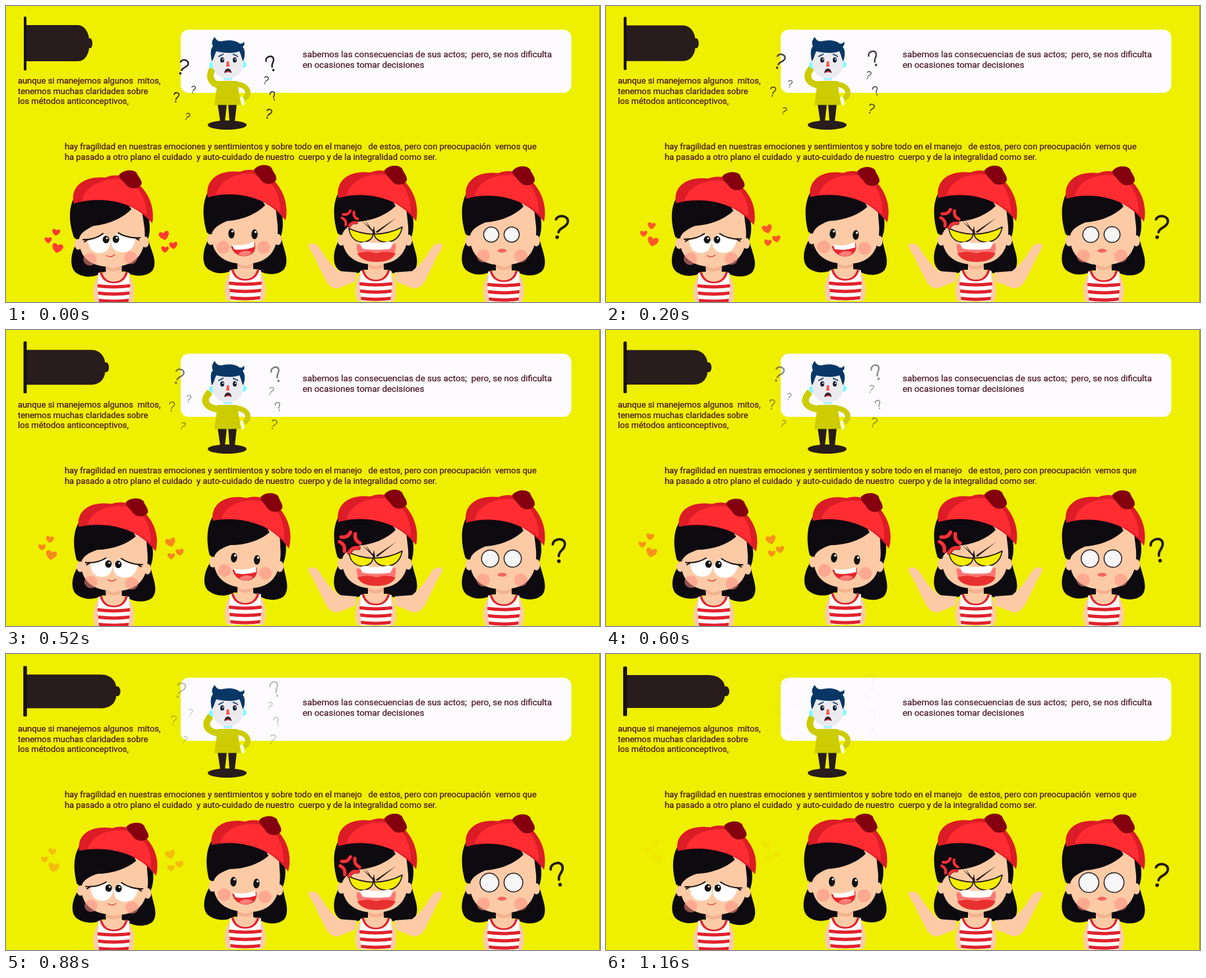
Recreate the animation shown at these times as an HTML page. Size 901x450 px, loop 1200 ms.

```html
<!DOCTYPE html>
<html lang="es">
<head>
<meta charset="utf-8">
<style>
html, body { margin: 0; height: 100%; overflow: hidden; background: #efef00; }
svg { display: block; width: 901px; height: 450px; }
text { font-family: Roboto, Arial, sans-serif; fill: #430d1a; stroke: #430d1a; stroke-width: .2; white-space: pre; }
</style>
</head>
<body>
<svg id="stage" viewBox="0 0 901 450" xmlns="http://www.w3.org/2000/svg">
<defs>
  <g id="ask">
    <path d="M-.47-.55C-.42-1.08 .6-1.12 .52-.5C.46-.05 0-.02 0 .42" fill="none" stroke="#221a1a" stroke-width=".2" stroke-linecap="round"/>
    <circle cy=".84" r=".15" fill="#221a1a"/>
  </g>
  <path id="heart" d="M0 .9C-1.7-.1-.9-1.4 0-.5C.9-1.4 1.7-.1 0 .9" fill="#ff3c32"/>
  <g id="backHair">
    <path fill="#0d0a10" d="M697 288C686 320 699 342 701 354C690 370 687 395 700 403C712 411 728 409 738 402H772C785 412 805 412 814 402C823 388 812 370 809 352C815 335 812 310 800 295Z"/>
  </g>
  <g id="body">
    <path fill="#fccba6" d="M743 388H767V402Q781 404 784 420Q788 435 783 450H727Q721 435 726 420Q729 404 743 402Z"/>
    <path fill="#f3b28e" d="M743 392Q755 401 767 392V398Q755 405 743 398Z"/>
    <clipPath id="vest"><path d="M731 404L737 402Q741 417 755 417Q769 417 773 402L779 404Q777 416 780 423L777 450H733L730 423Q733 416 731 404Z"/></clipPath>
    <g clip-path="url(#vest)" fill="none" stroke="#e0222c">
      <rect x="720" y="400" width="70" height="50" fill="#fff" stroke="none"/>
      <path stroke-width="5" d="M722 422Q755 428 788 422M722 433Q755 439 788 433M722 444Q755 450 788 444"/>
      <path stroke-width="5" d="M736 402Q740 417 755 417Q770 417 774 402"/>
    </g>
  </g>
  <g id="head">
    <g fill="#fccba6">
      <ellipse cx="702.500" cy="357" rx="5.500" ry="8.500"/><ellipse cx="804.500" cy="357" rx="5.500" ry="8.500"/>
      <path d="M704 300V340C701 372 714 394 754 394C794 394 806 370 804 335L800 300Z"/>
    </g>
    <path fill="#0d0a10" d="M699 284C689 300 690 325 697 347L704 349C706 340 715 334 727 329C752 327 772 318 785 305L770 280Z"/>
    <path fill="#dc1c26" d="M698 293C693 267 714 250 747 254C764 246 790 254 804 274C816 290 820 310 816 328C804 313 789 301 768 294C745 287 720 287 698 293Z"/>
    <path fill="#ff2d32" d="M711 289C715 268 740 255 768 257C794 262 808 284 808 315C797 305 785 299 768 294C745 287 728 287 711 289Z"/>
    <path fill="#85000f" d="M768 251C773 243 789 241 795 248C797 255 803 259 802 266C797 275 784 274 779 267C775 261 769 258 768 251Z"/>
  </g>
</defs>

<rect width="901" height="450" fill="#efef00"/>
<rect x="900" width="1" height="450" fill="#95950f"/>
<rect x="265" y="36" width="592.500" height="96" rx="12" fill="#fdfbfe"/>
<path id="sleeve" fill="#281c1c"/>
<rect id="ring" fill="#17100f" rx="1.500"/>

<g id="man">
  <ellipse cx="335.500" cy="181" rx="29.500" ry="7" fill="#281c1c"/>
  <path fill="#281c1c" d="M321 149H335L332 176H325ZM337 149H350L347 176H339Z"/>
  <path fill="none" stroke="#cccc00" stroke-width="8" d="M346 119C366 118 373 133 361 141"/>
  <path fill="#fff" d="M355 139L359 137L362 150L358 151Z"/>
  <path id="arm" fill="none" stroke="#cccc00" stroke-width="10" stroke-linejoin="round"/>
  <path fill="#ebebef" d="M330 103H343V115H330Z"/>
  <path fill="#8ffbff" d="M330 109H343V112H330Z"/>
  <path fill="#cccc00" d="M321 114H351L356 150.500H316Z"/>
  <g fill="#7ffaff"><circle cx="313.500" cy="90" r="5.500"/><circle cx="360" cy="89" r="5"/></g>
  <path fill="#ebebef" d="M313 70H360V88C359 102 349 110 337 110C324 110 314 102 313 88Z"/>
  <path fill="#083765" d="M312 84C310 72 310 65 314 61C311 57 313 50 317 47C318 52 323 55 330 53C340 51 350 53 354 57Q359 58 361 54Q363 59 359 62C364 68 362 78 360 84C357 80 357 74 354 69C342 73 327 71 319 69C316 74 316 80 312 84Z"/>
  <path fill="none" stroke="#083765" stroke-width="1.500" d="M322 77L330 73M344 73L352 77"/>
  <g fill="#142033"><ellipse cx="328" cy="82" rx="3" ry="4"/><ellipse cx="347" cy="82" rx="3" ry="4"/></g>
  <g fill="#fff"><circle cx="329" cy="81" r="1"/><circle cx="348" cy="81" r="1"/></g>
  <path fill="#ff5045" d="M335 84H338L339 92H334Z"/>
  <path fill="#38202a" d="M331 102Q332 95 337 95Q342 96 342 102Q337 99 331 102Z"/>
  <path fill="#ee4b44" d="M333 101Q337 97 341 101Z"/>
</g>
<g id="copy"></g>
<g id="girls"></g>
<g id="marks"></g>
<g id="rage" fill="none" stroke-linecap="round"></g>
</svg>

<script>
const LOOP = 1200, STEP = 40;
const $ = id => document.getElementById(id);
const set = (el, attrs) => { for (const k in attrs) el.setAttribute(k, attrs[k]); };

// Running text: x, first baseline, font size, lines
const copy = [
  [18, 118, 12.9, "aunque si manejemos algunos  mitos,", "tenemos muchas claridades sobre", "los métodos anticonceptivos,"],
  [450, 78, 13.33, "sabemos las consecuencias de sus actos;  pero, se nos dificulta", "en ocasiones tomar decisiones"],
  [89, 218, 12.9, "hay fragilidad en nuestras emociones y sentimientos y sobre todo en el manejo   de estos, pero con preocupación  vemos que",
    "ha pasado a otro plano el cuidado  y auto-cuidado de nuestro  cuerpo y de la integralidad como ser."]
];
$("copy").innerHTML = copy.map(([x, y, size, ...lines]) =>
  lines.map((s, i) => `<text x="${x}" y="${y + i * 15.6}" font-size="${size}">${s}</text>`).join("")).join("");

const cheeks = (x1, x2, y) =>
  `<g fill="#ff8f80" opacity=".55"><circle cx="${x1}" cy="${y}" r="10"/><circle cx="${x2}" cy="${y}" r="10"/></g>`;

const sad = cheeks(128, 190, 383) + `
  <path fill="#fff" d="M126 354Q139 351 150 344Q160 348 160 358Q158 374 143 374Q128 373 126 354ZM198 354Q185 351 172 344Q161 348 161 358Q163 374 179 374Q195 373 198 354Z"/>
  <g fill="#111"><ellipse cx="153.500" cy="353" rx="5" ry="6"/><ellipse cx="168.500" cy="353" rx="5" ry="6"/></g>
  <g fill="#fff"><circle cx="155" cy="351" r="1.500"/><circle cx="170" cy="351" r="1.500"/></g>
  <path fill="none" stroke="#17100f" stroke-width="2" d="M150 343Q137 353 118 352M120 356L126 352M172 343Q186 353 206 352M204 356L198 352"/>
  <path fill="none" stroke="#e2453c" stroke-width="1.500" d="M153 378Q160 383 166 377"/>`;

const happy = cheeks(329, 391, 367) + `
  <g fill="#111"><ellipse cx="342" cy="346" rx="4.700" ry="7.500"/><ellipse cx="377" cy="347" rx="4.700" ry="7.500"/></g>
  <g fill="#fff"><circle cx="343.500" cy="342.500" r="1.700"/><circle cx="378.500" cy="343.500" r="1.700"/></g>
  <path fill="#e5262c" d="M341 365Q360 367 377 359Q381 372 371 378Q359 384 348 376Q343 372 341 365Z"/>
  <path fill="#ff7d78" d="M352 377Q361 369 373 374Q369 380 361 380Q355 380 352 377Z"/>
  <path fill="#fff" d="M343 363Q360 366 376 358L377 366Q362 372 346 370Z"/>`;

const angry = `
  <g fill="#f5ee00" stroke="#17100f" stroke-width="1.500" stroke-linejoin="round">
    <path d="M520 338Q536 346 557 347Q554 359 539 359Q523 357 520 338Z"/>
    <path d="M601 336Q583 346 558 347Q562 359 578 359Q597 357 601 336Z"/>
  </g>
  <path fill="#17100f" d="M540 327L557 341L558 345ZM561 343L592 322L563 345ZM556 346L558 334L560 346ZM551 336L544 325L554 338Z"/>
  <path fill="#ff7672" d="M532 362Q562 369 591 361Q594 389 562 389Q530 389 532 362Z"/>
  <path fill="#e8302f" d="M533 376Q548 371 562 376Q577 371 591 376Q585 389 562 389Q539 389 533 376Z"/>
  <path fill="#fff" d="M537 362Q540 357 549 359Q562 362 575 359Q584 356 587 361L583 369Q562 372 541 369Z"/>`;

const blank = cheeks(724, 781, 380) + `
  <g fill="#f7f6f6" stroke="#292225" stroke-width="1.500"><circle id="eyeL" cy="347.500"/><circle id="eyeR" cy="347.500"/></g>
  <ellipse cx="752.500" cy="372" rx="7" ry="3" fill="#f2685f"/>`;

const arm = `<path fill="#fccba6" d="M459 364C461 359 470 361 474 366C480 374 488 390 505 403L532 405L530 419L504 429Q492 431 484 415L471 389C468 379 460 371 459 364Z"/>`;
const arms = arm + `<g transform="translate(1121 0) scale(-1 1)">${arm}</g>`;

function girl(x, y, face, extra = "") {
  const back = `translate(${-x} ${-y})`;
  return `<g transform="translate(${x} ${y})"><g class="turn"><use href="#backHair"/></g>
    <g transform="${back}">${extra}</g><use href="#body"/>
    <g class="turn"><use href="#head"/><g transform="${back}">${face}</g></g></g>`;
}
$("girls").innerHTML = girl(-591.5, 2, sad) + girl(-392, -2, happy) + girl(-194, -1, angry, arms) + girl(0, 0, blank);
const turns = [...document.querySelectorAll(".turn")];

// Floating signs: shape, x, y, half size, tilt
const group = (name, list) => list.map(([x, y, s, r]) =>
  `<use href="#${name}" transform="translate(${x} ${y}) rotate(${r}) scale(${s})"/>`).join("");
$("marks").innerHTML = [
  group("ask", [[268, 93, 12, 20], [284, 127, 5.5, 10], [258, 139, 7.5, 6], [275, 168, 5.5, 25]]),
  group("ask", [[402, 88, 12, -20], [394, 113, 6, 18], [405, 137, 7, -20], [398, 164, 7.5, 18]]),
  group("heart", [[64, 356, 5.5, 0], [76, 344, 6, 8], [78, 368, 8.3, 12]]),
  group("heart", [[240, 349, 7.7, -14], [241, 370, 5.7, 4], [254, 364, 6.2, -8]]),
  `<use href="#ask"/>`
].map(s => `<g>${s}</g>`).join("");
const [askL, askR, heartL, heartR, bigAsk] = $("marks").children;

const corners = [0, 90, 180, 270].map(a => `<path transform="rotate(${a})" d="M3 12Q4 4 12 3"/>`).join("");
$("rage").innerHTML = `<g stroke="#4b0a10" stroke-width="5">${corners}</g><g stroke="#ff3038" stroke-width="4">${corners}</g>`;

function drift(el, dx, dy, p) {
  set(el, { transform: `translate(${dx} ${dy})`, opacity: 1 - p });
}
function turnHead(i, angle, sy) {
  for (const el of turns.slice(i * 2, i * 2 + 2))
    set(el, { transform: `translate(755 405) rotate(${angle}) scale(1 ${sy}) translate(-755 -405)` });
}

function draw(t) {
  const p = t / LOOP, wave = Math.sin(Math.PI * p);

  // stretching shape, top left
  const top = 29 + 3 * p, low = 84 - 2 * p, mid = 56.5, end = 126 + 56 * p, bend = 109 + 47 * p;
  set($("ring"), { x: 27 - p, y: 16 + 3 * p, width: 4 + 2 * p, height: 82 - 7 * p });
  set($("sleeve"), { d: `M30 ${top}H${bend}C${end - 5} ${top} ${end} ${mid - 12} ${end} ${mid - 7}
    C${end + 2} ${mid - 9} ${end + 5 + 2 * p} ${mid - 6} ${end + 5 + 2 * p} ${mid}
    C${end + 5 + 2 * p} ${mid + 7} ${end + 2} ${mid + 9} ${end} ${mid + 7}
    C${end} ${mid + 14} ${end - 5} ${low} ${bend} ${low}H30Z` });

  const sway = 9 * wave;
  set($("arm"), { d: `M326 121C${312 - sway * .9} 119 ${305 - sway * 1.1} 109 ${314 - sway * .5} 94` });

  const lead = Math.sin(Math.PI * p ** .75);
  drift(askL, -6.8 * lead, -51.5 * p, p);
  drift(askR, 8 * wave, -46.5 * p, p);
  drift(heartL, -9.5 * lead, -59.5 * p, p);
  drift(heartR, 10.3 * Math.sin(Math.PI * t / 1360), -60.5 * p, p);

  const tilt = Math.max(-1, Math.min(1, 2.2 * Math.cos(2 * Math.PI * (t - 170) / LOOP) + .4));
  set(bigAsk, { transform: `translate(${838.5 + 1.5 * tilt} ${336 + tilt * .5}) rotate(${1 + 14 * tilt}) scale(18.5)` });

  const lean = Math.sin(Math.PI * t / 1520), nod = Math.sin(Math.PI * t / 1220);
  turnHead(0, -2 + 4.6 * lean, .97 - .03 * lean);
  turnHead(1, 4 * nod, 1 - .025 * nod);

  set($("rage"), { transform: `translate(521.5 323) rotate(18) scale(${.95 + .32 * wave})` });

  const r = 11.5 + 3.7 * p;
  set($("eyeL"), { cx: 747.5 - r, r });
  set($("eyeR"), { cx: 755.5 + r, r });
}

function frame(now) {
  draw(Math.floor(now % LOOP / STEP) * STEP);
  requestAnimationFrame(frame);
}
draw(0);
requestAnimationFrame(frame);
</script>
</body>
</html>
```
